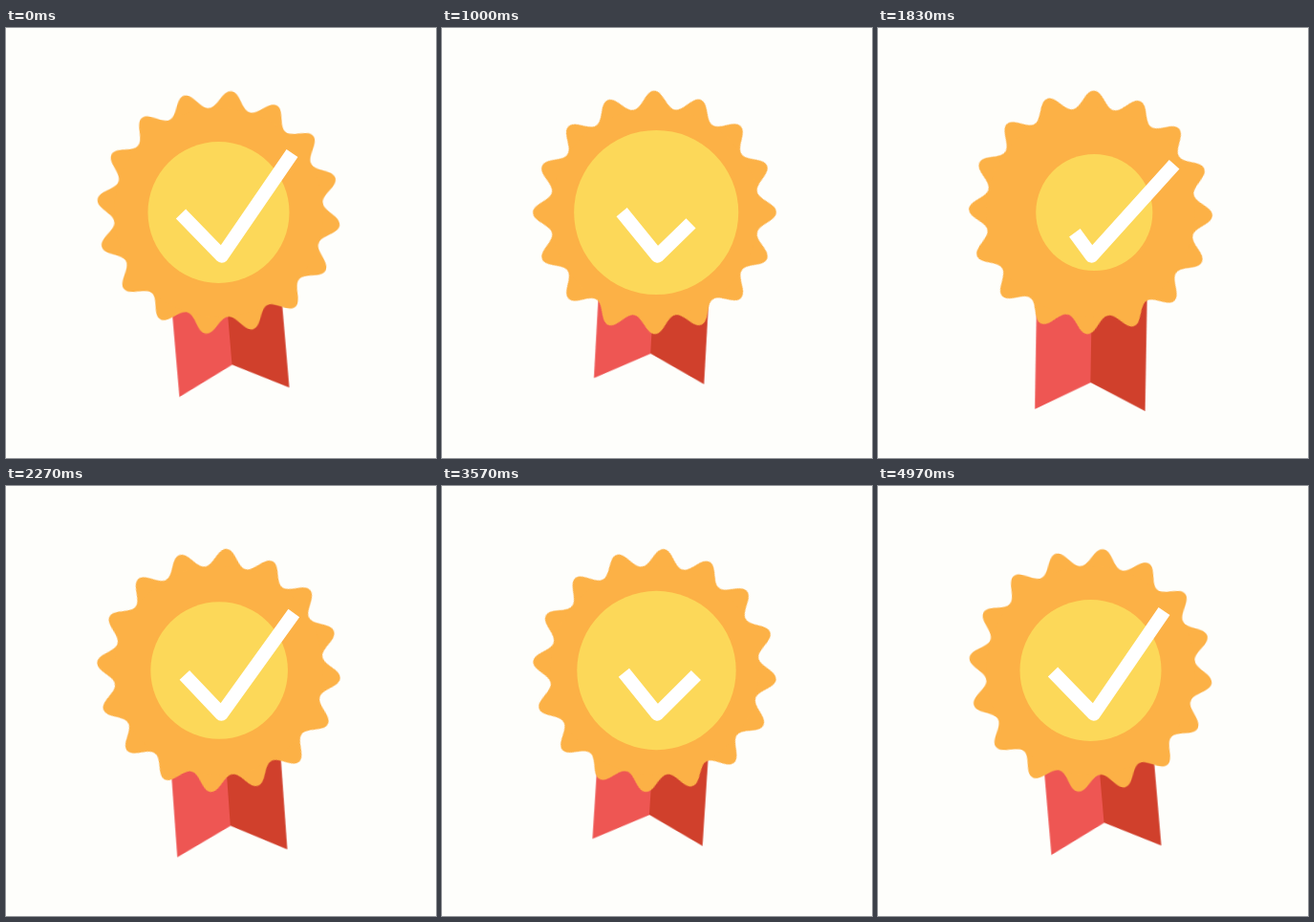
Recreate the animation shown at these times as an HTML page without scripts. Size 450 by 450 pixels, loop 5.01 s.

```html
<!DOCTYPE html>
<html lang="en">
<head>
<meta charset="utf-8">
<title>Award badge</title>
<style>
  html, body { margin: 0; width: 100%; height: 100%; overflow: hidden; background: #fefefb; }
  svg { display: block; width: 100vw; height: 100vh; }

  .swing, .drop, .disc, .tick {
    animation: 2505ms cubic-bezier(.333, 0, .667, 1) infinite;
  }
  .swing { animation-name: swing; }
  .drop { animation-name: drop; }
  .disc { animation-name: pulse; fill: #fcd859; }
  .tick {
    animation-name: tick;
    fill: none; stroke: #fff; stroke-width: 14.4; stroke-linejoin: round;
  }
  .seal { animation: turn 5010ms infinite; fill: #fcb146; }

  @keyframes swing {
    0%, 98.67%, 100% { transform: rotate(-4.9deg); }
    54% { transform: rotate(4.8deg); }
  }
  @keyframes drop {
    0%, 98.67%, 100% { transform: translateY(163.8px); }
    32.67% { transform: translateY(147px); }
    65.33% { transform: translateY(184.8px); }
  }
  @keyframes pulse {
    0%, 98.67%, 100% { r: 74px; cx: 0; }
    32.67% { r: 90px; cx: 1.3px; }
    65.33% { r: 59px; cx: 4.4px; }
  }
  @keyframes tick {
    0%, 98.67%, 100% { d: path("M183 194.5L225.8 238.5L299.5 131"); }
    32.67% { d: path("M185 189L225.8 238.5L253 213"); }
    65.33% { d: path("M209.5 217.5L223.3 238.5L311.8 144.6"); }
  }
  /* one full turn, gathering speed to the middle and slowing to the end */
  @keyframes turn {
    0% { transform: rotate(6deg); animation-timing-function: cubic-bezier(.333, .1, .667, .43); }
    10.67% { transform: rotate(19.2deg); animation-timing-function: cubic-bezier(.333, .22, .667, .57); }
    28.67% { transform: rotate(77.7deg); animation-timing-function: cubic-bezier(.333, .27, .667, .63); }
    45.33% { transform: rotate(161.2deg); animation-timing-function: cubic-bezier(.333, .32, .667, .69); }
    59.33% { transform: rotate(243.6deg); animation-timing-function: cubic-bezier(.333, .47, .667, .75); }
    83.33% { transform: rotate(335.2deg); animation-timing-function: cubic-bezier(.333, .49, .667, .87); }
    99.33%, 100% { transform: rotate(366deg); }
  }
</style>
</head>
<body>
<svg viewBox="0 0 450 450" role="img" aria-label="Award badge with a check mark">
  <defs>
    <!-- one tooth, doubled four times to make sixteen -->
    <path id="tooth" d="M0 0L-21.4 -107.4C-12.3 -109.2 -9.5 -127.4 0 -127.4S12.3 -109.2 21.4 -107.4Z"/>
    <g id="two"><use href="#tooth"/><use href="#tooth" transform="rotate(22.5)"/></g>
    <g id="four"><use href="#two"/><use href="#two" transform="rotate(45)"/></g>
    <g id="eight"><use href="#four"/><use href="#four" transform="rotate(90)"/></g>
  </defs>

  <g transform="translate(225 218)">
    <g class="swing">
      <g class="drop">
        <path fill="#ee5653" d="M-57.7 0L.5 -29V-150H-57.7Z"/>
        <path fill="#d0402c" d="M57.7 0L0 -29V-150H57.7Z"/>
      </g>
    </g>
  </g>

  <g transform="translate(222.5 193)">
    <g class="seal">
      <use href="#eight"/>
      <use href="#eight" transform="rotate(180)"/>
      <circle r="109.3"/>
    </g>
    <circle class="disc" r="74"/>
  </g>

  <path class="tick" d="M183 194.5L225.8 238.5L299.5 131"/>
</svg>
</body>
</html>
```
